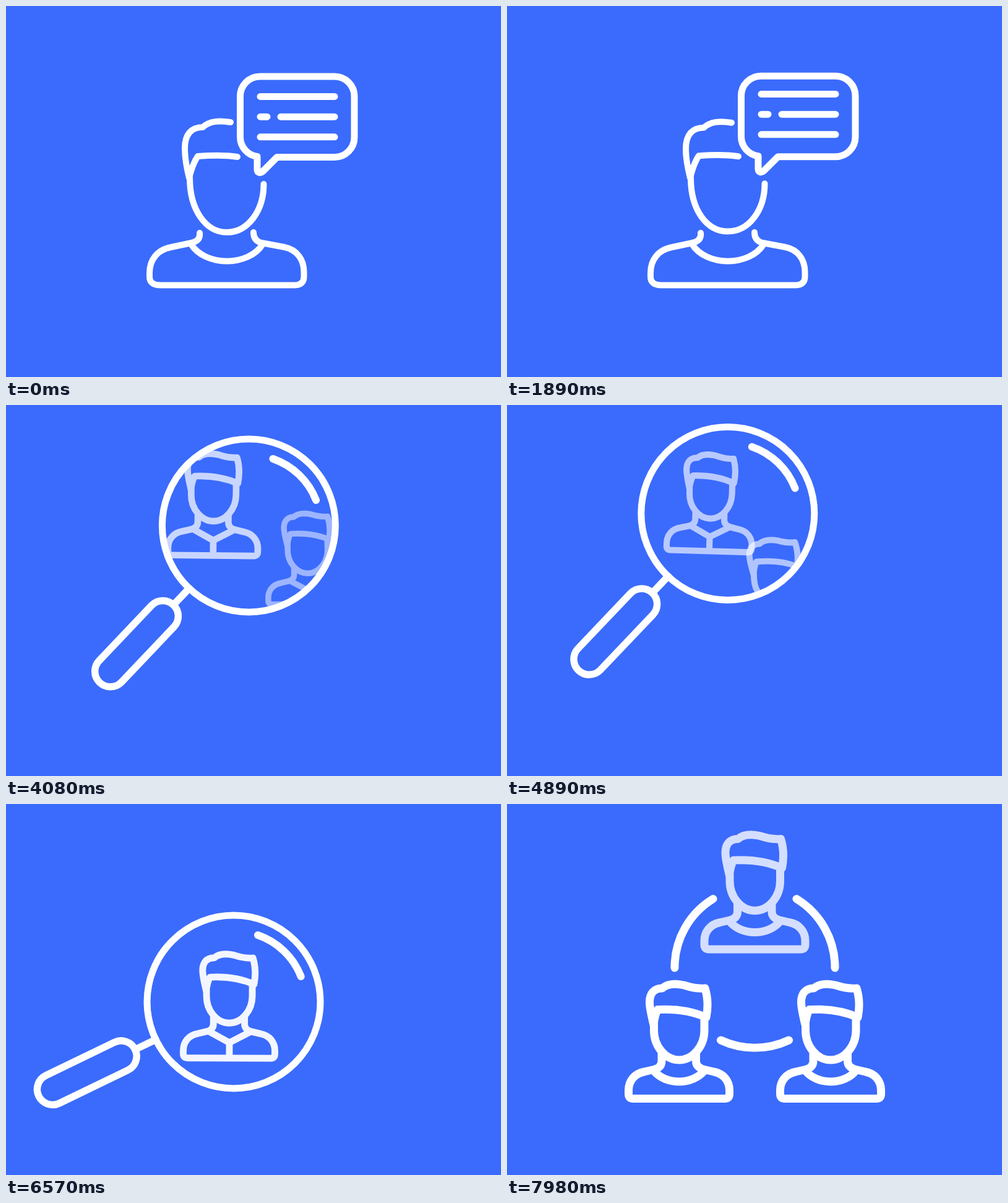
An HTML page for the animation above (8 s loop, 800x600 px).

```html
<!DOCTYPE html>
<html lang="en">
<head>
<meta charset="utf-8">
<title>Team search</title>
<style>
  html, body { margin: 0; height: 100%; overflow: hidden; background: #3b6bfc; }
  svg { display: block; width: 100%; height: 100%; }
</style>
</head>
<body>
<svg viewBox="0 0 800 600" fill="none" stroke="#fff" stroke-linecap="round" stroke-linejoin="round">
  <defs>
    <g id="bust">
      <path d="M250 404V416C250 424 244 428 237 429.500L222 433C206 436 196.500 448 196.500 463V469Q196.500 476.500 204 476.500H352Q359.500 476.500 359.500 469V463C359.500 448 350 436 334 433L319 429.500C312 428 305.500 424 305.500 416V404"/>
      <path d="M237.500 357V366C237.500 392 256 414 278 414C300 414 319 392 319 366V346"/>
      <path d="M237 357C234 344 231 333 230.500 322C230 307 237 298 251 298C260 290 272 290 286 293C298 297 309 299 320 298C325 314 325 330 322 345C297 334 270 331 243.500 332.500C240 339 238 347 237 357"/>
    </g>
    <g id="member" stroke-width="13">
      <use href="#bust"/>
      <path d="M237 431C256 455 300 455 319 431"/>
    </g>
    <g id="shirt" stroke-width="12">
      <use href="#bust"/>
      <path d="M242 429L278.500 449L317 429M278.500 449V476"/>
    </g>
    <clipPath id="glass"><circle r="138"/></clipPath>
    <clipPath id="page"><rect x="400" y="130" width="142" height="96"/></clipPath>
  </defs>

  <g id="talk" stroke-width="10">
    <path d="M313 367C314 376 309 381 300 383L267 390C245 394 232 410 232 432V438C232 447 238 451.500 249 451.500H467C476 451.500 481.500 447 481.500 438V430C481.500 410 470 394 450 390L413 383C405 381 400 376 400 366M299 385C322 422 392 422 415 385"/>
    <path id="face"/>
    <path id="hair"/>
    <g id="bubble">
      <path stroke-width="11" d="M438 244.500H531A32 32 0 0 0 563 212.500V146A32 32 0 0 0 531 114H410.500A32 32 0 0 0 378.500 146V212A32 32 0 0 0 406 243.500V264C406 270 411 271 415 267.500Z"/>
      <g clip-path="url(#page)"><path id="lines" stroke-width="11"/></g>
    </g>
  </g>

  <g id="search">
    <g id="lens">
      <g clip-path="url(#glass)"><g id="field">
        <use id="first" href="#shirt"/>
        <use id="second" href="#shirt"/>
      </g></g>
      <circle r="140" stroke-width="11"/>
      <path stroke-width="12" d="M39-108A115 115 0 0 1 108.700-41"/>
      <g id="handle" stroke-width="11.500">
        <path d="M140 0H177"/>
        <rect x="177" y="-25" width="173" height="50" rx="25"/>
      </g>
    </g>
  </g>

  <g id="team">
    <path stroke-width="13" d="M333 153.500A129.500 129.500 0 0 0 271 265M468 153.500A129.500 129.500 0 0 1 530 265M345.500 382A129.500 129.500 0 0 0 455.500 382"/>
    <use id="left" href="#member"/>
    <use id="right" href="#member"/>
    <use id="top" href="#member" opacity=".78"/>
  </g>
</svg>
<script>
const LOOP = 8000, CUT_A = 3570, CUT_B = 6900;
const el = {};
document.querySelectorAll('svg [id]').forEach(e => el[e.id] = e);
const set = (id, name, value) => el[id].setAttribute(name, value);
const move = (id, x, y) => set(id, 'transform', `translate(${x} ${y})`);
const unit = v => Math.max(0, Math.min(1, v));
const wave = (t, period) => (1 - Math.cos(2 * Math.PI * t / period)) / 2;

// Smooth curve through [time, value] keys
function track(t, keys) {
  const last = keys.length - 1;
  if (t <= keys[0][0]) return keys[0][1];
  if (t >= keys[last][0]) return keys[last][1];
  const i = keys.findIndex(k => k[0] > t) - 1;
  const slope = j => {
    if (j === 0 || j === last) return 0;
    const [a, b, c] = [keys[j - 1], keys[j], keys[j + 1]];
    const p = (b[1] - a[1]) / (b[0] - a[0]), q = (c[1] - b[1]) / (c[0] - b[0]);
    return p * q > 0 ? 2 * p * q / (p + q) : 0;
  };
  const [t0, v0] = keys[i], [t1, v1] = keys[i + 1];
  const d = t1 - t0, u = (t - t0) / d, s = u * u * (3 - 2 * u);
  return v0 + (v1 - v0) * s
    + d * u * (1 - u) * ((1 - u) * slope(i) - u * slope(i + 1));
}

const slideOut = (t, cut) => -200 * unit((t - cut + 270) / 270) ** 2;
const slideIn = (t, cut, from) => from * (1 - unit((t - cut) / 450)) ** 3;

function drawTalk(t) {
  const nod = wave(t, 2260), lift = -6 * wave(t, 2140);
  const chin = 366 - 6 * nod, up = 3 * nod;
  move('talk', slideOut(t, CUT_A), 0);
  move('bubble', 0, lift);
  set('face', 'd', `M297 278C297 330 323 ${chin} 357 ${chin}C391 ${chin} 416.500 ${331 + lift} 416.500 ${288 + lift}`);
  set('hair', 'd', `M363 ${188 + up}C343 ${185 + up} 329 ${186 + up} 318 ${196 + up}C300 ${196 + up} 289 ${207 + up} 289 ${230 + up}C289 248 292 262 296 278C300 262 305 ${250 - up} 310 ${243 - up}C335 ${241 - up} 355 ${241 - up} 374 ${244 - up}`);

  const pitch = 32.7, rows = t / 900, start = Math.floor(rows) - 1;
  let d = '';
  for (let i = start; i < start + 6; i++) {
    const y = 146.5 + (i - rows) * pitch;
    d += i % 2 ? `M411 ${y}H422M444 ${y}H531` : `M411 ${y}H531`;
  }
  set('lines', 'd', d);
}

function drawPerson(id, x, y, turn, scale, opacity) {
  set(id, 'transform', `translate(${x} ${y}) rotate(${turn}) scale(${scale * .908}) translate(-278.500 -449)`);
  set(id, 'opacity', opacity);
}

function drawSearch(t) {
  const x = track(t, [[4080, 392.4], [4250, 397], [4875, 357], [5300, 354], [5610, 356.5], [6100, 356], [6480, 365], [6570, 368]]);
  const y = track(t, [[3570, 208], [4080, 195], [4850, 175], [5610, 271], [5700, 281], [6100, 314], [6570, 320], [6900, 328]]);
  const angle = track(t, [[4860, 133.5], [5610, 146.3], [6100, 153], [6570, 154.2]]);
  move('search', t < CUT_B - 270 ? slideIn(t, CUT_A, 215) : slideOut(t, CUT_B), 0);
  move('lens', x, y);
  move('field', -x, -y);
  set('handle', 'transform', `rotate(${angle})`);

  const at = (...v) => track(t, [4080, 5610, 6570].map((k, i) => [k, v[i]]));
  drawPerson('first', at(335, 316, 300), at(219, 204, 190), at(.6, 3, 4), at(.98, .86, .8), at(.72, .48, 0));
  drawPerson('second', at(488.5, 381, 361), at(300, 390, 386), at(-.8, -4, .2), at(.87, .97, 1), at(.5, .75, .94));
}

function drawTeam(t) {
  const low = track(t, [[7560, 7], [7980, 0]]);
  const high = track(t, [[7560, 28], [7840, -4], [7980, 0]]);
  move('team', slideIn(t, CUT_B, 140), 0);
  move('left', 0, low);
  move('right', 245, low);
  move('top', 122.5, high - 241.5);
}

const scenes = [['talk', drawTalk, 0, CUT_A], ['search', drawSearch, CUT_A, CUT_B], ['team', drawTeam, CUT_B, LOOP]];

function frame(now) {
  const t = now % LOOP;
  for (const [id, draw, from, to] of scenes) {
    const on = t >= from && t < to;
    el[id].style.display = on ? '' : 'none';
    if (on) draw(t);
  }
  requestAnimationFrame(frame);
}
frame(0);
</script>
</body>
</html>
```
